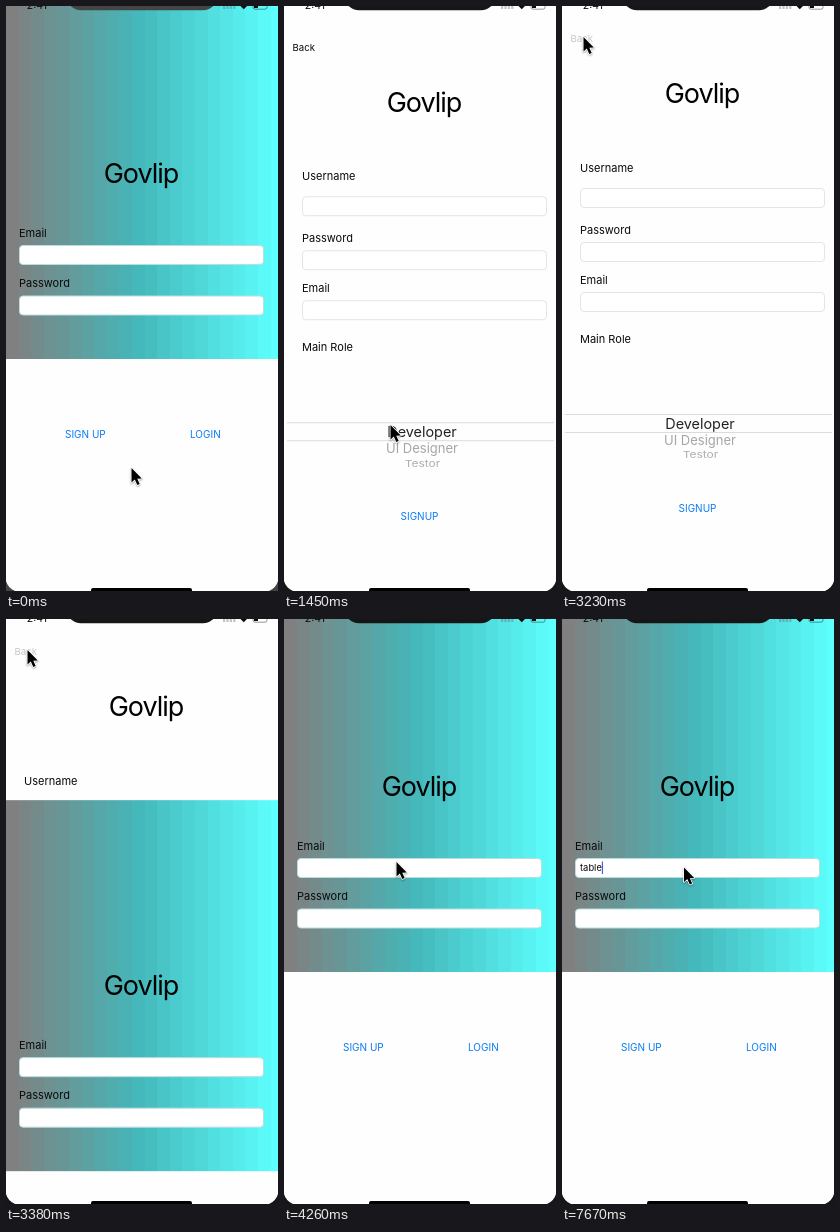
An HTML page with a canvas that plays this animation: 272 by 585 pixels, repeating every 8 s.

```html
<!DOCTYPE html>
<html lang="en">
<head>
<meta charset="utf-8">
<title>Sign-up flow</title>
<style>
  html, body { margin: 0; width: 100%; height: 100%; overflow: hidden; background: #fff; }
  canvas { display: block; width: 272px; height: 585px; }
</style>
</head>
<body>
<canvas id="stage"></canvas>
<script>
const W = 272, H = 585, LOOP = 8000, TICK = 148, LEAD = 32;
const SHEET_TOP = -18, TRAVEL = 605;
const BLUE = '#0a7cf5', INK = '#0a0a0a', APP = 'Govlip';

const canvas = document.getElementById('stage');
const ctx = canvas.getContext('2d');
const dpr = window.devicePixelRatio || 1;
canvas.width = W * dpr;
canvas.height = H * dpr;

// Pointer tip: time, x, y
const path = [
  [0, 125.5, 462], [120, 122, 459], [560, 87.5, 426], [1152, 87.5, 426],
  [1448, 106.5, 419], [1892, 165, 403], [2188, 194, 350], [2484, 130, 190],
  [2780, 44, 60], [2928, 21.5, 31], [3372, 21.5, 31], [3520, 25.5, 35.5],
  [3668, 44, 70], [3964, 96, 200], [4260, 112.5, 243], [6480, 112.5, 243],
  [6776, 122, 248.5], [LOOP, 122, 248.5]
];

function pointerAt(t) {
  let i = 1;
  while (i < path.length - 1 && t > path[i][0]) i++;
  const [t0, x0, y0] = path[i - 1], [t1, x1, y1] = path[i];
  const k = (t - t0) / (t1 - t0);
  return [x0 + (x1 - x0) * k, y0 + (y1 - y0) * k];
}

// Critically damped slide from the bottom edge
function slide(t, start, rate) {
  const u = Math.max(0, t - start) * rate;
  return TRAVEL * (1 + u) * Math.exp(-u);
}

function text(str, x, mid, size, { color = INK, align = 'left', spacing = 0, alpha = 1 } = {}) {
  ctx.font = `${size}px Inter, "Liberation Sans", sans-serif`;
  ctx.letterSpacing = spacing + 'px';
  ctx.textAlign = align;
  ctx.fillStyle = color;
  ctx.globalAlpha = alpha;
  ctx.fillText(str, x, mid + size * 0.364);
  ctx.globalAlpha = 1;
}

const title = (x, mid) => text(APP, x, mid, 27, { align: 'center', spacing: -1, color: '#000' });

function rounded(x, y, w, h, r) {
  ctx.beginPath();
  ctx.roundRect(x, y, w, h, r);
}

function field(x, y, w, edge) {
  rounded(x + 0.5, y + 0.5, w - 1, 19, 3.5);
  ctx.fillStyle = '#fff';
  ctx.fill();
  ctx.strokeStyle = edge;
  ctx.lineWidth = 1;
  ctx.stroke();
}

function mix(a, b, k) {
  return `rgb(${a.map((v, i) => Math.round(v + (b[i] - v) * k)).join()})`;
}

function bands(bottom) {
  const grey = [128, 128, 128], teal = [68, 184, 186], cyan = [94, 255, 255];
  const step = 12.6;
  for (let i = 0; i * step < W; i++) {
    ctx.fillStyle = i < 10 ? mix(grey, teal, i / 10) : mix(teal, cyan, (i - 10) / 11);
    const x = Math.round(i * step);
    ctx.fillRect(x, SHEET_TOP, Math.round((i + 1) * step) - x, bottom - SHEET_TOP);
  }
}

function page(offset, draw) {
  ctx.save();
  ctx.translate(0, offset);
  ctx.fillStyle = '#fefefe';
  ctx.fillRect(0, SHEET_TOP, W, TRAVEL);
  draw();
  ctx.restore();
}

function login(t, pressed) {
  bands(353);
  title(135, 167.5);
  text('Email', 13, 226.5, 11);
  field(13, 239, 245, '#b9dede');
  text('Password', 13, 277, 11);
  field(13, 289.5, 245, '#b9dede');
  text('SIGN UP', 59, 428, 10, { color: BLUE, alpha: pressed ? 0.3 : 1 });
  text('LOGIN', 184, 428, 10, { color: BLUE });
  if (t >= 6900) typing(t);
}

function typing(t) {
  const count = Math.max(0, Math.min(5, Math.floor((t - 7072) / TICK) + 1));
  const word = 'table'.slice(0, count);
  text(word, 18, 249, 9.4);
  ctx.fillStyle = '#4a5fe0';
  ctx.fillRect(18 + ctx.measureText(word).width, 242.5, 1.2, 12.5);
}

function signup(pressed) {
  text('Back', 8.5, 33, 9.6, { alpha: pressed ? 0.22 : 1 });
  title(140, 87.5);
  text('Username', 18, 162, 11);
  field(18, 182, 245, '#e4e4e4');
  text('Password', 18, 224, 11);
  field(18, 236, 245, '#e4e4e4');
  text('Email', 18, 274, 11);
  field(18, 286, 245, '#e4e4e4');
  text('Main Role', 18, 333, 11);
  picker();
  text('SIGNUP', 135.5, 502, 10, { color: BLUE, align: 'center' });
}

function picker() {
  ctx.fillStyle = '#dcdcdc';
  ctx.fillRect(3, 408, 267, 1);
  ctx.fillRect(3, 426, 267, 1);
  text('Developer', 138, 418, 14.4, { align: 'center', color: '#222' });
  text('UI Designer', 138, 434.5, 13, { align: 'center', color: '#a6a6a6' });
  ctx.save();
  ctx.beginPath();
  ctx.rect(100, 442, 80, 11);
  ctx.clip();
  ctx.translate(0, 449);
  ctx.scale(1, 0.8);
  text('Testor', 138.5, 0, 12, { align: 'center', color: '#adadad' });
  ctx.restore();
}

function phone(shell) {
  text('2:41', 31, -0.5, 10.5, { align: 'center' });
  ctx.fillStyle = 'rgba(90,110,110,.4)';
  for (let i = 0; i < 4; i++) ctx.fillRect(217 + i * 3.4, 0, 2.2, 3);
  ctx.fillStyle = INK;
  ctx.beginPath();
  ctx.moveTo(234.5, 0);
  ctx.lineTo(241, 0);
  ctx.lineTo(237.8, 3.2);
  ctx.fill();
  ctx.fillRect(248, 0, 4, 2);
  rounded(247, -5, 14, 8.2, 2);
  ctx.strokeStyle = 'rgba(20,40,40,.6)';
  ctx.lineWidth = 0.8;
  ctx.stroke();

  ctx.fillStyle = shell;
  rounded(61, -26, 150, 30.3, 14);
  ctx.fill();
  // Screen corners
  for (const side of [0, W]) {
    const dir = side ? -1 : 1;
    ctx.beginPath();
    ctx.moveTo(side, 575);
    ctx.quadraticCurveTo(side + dir * 2, 582, side + dir * 9, H);
    ctx.lineTo(side, H);
    ctx.fill();
  }
  ctx.fillStyle = '#000';
  rounded(85, 582, 101, 5, 2);
  ctx.fill();
}

function pointer(x, y) {
  const shape = [0, 0, 0, 14.5, 3.3, 11.5, 5.8, 17, 8.2, 16, 5.8, 10.7, 10.3, 10.4];
  ctx.save();
  ctx.translate(x, y);
  ctx.beginPath();
  for (let i = 0; i < shape.length; i += 2) ctx.lineTo(shape[i], shape[i + 1]);
  ctx.closePath();
  ctx.lineJoin = 'round';
  ctx.shadowColor = 'rgba(0,0,0,.35)';
  ctx.shadowBlur = 2 * dpr;
  ctx.shadowOffsetY = dpr;
  ctx.strokeStyle = '#fff';
  ctx.lineWidth = 1.6;
  ctx.stroke();
  ctx.shadowColor = 'transparent';
  ctx.fillStyle = '#000';
  ctx.fill();
  ctx.restore();
}

function render(now) {
  // The screen refreshes in coarse ticks
  const t = Math.max(0, Math.floor((now % LOOP + LEAD) / TICK) * TICK - LEAD);
  ctx.setTransform(dpr, 0, 0, dpr, 0, 0);
  page(0, () => login(t, t >= 856 && t < 1152));
  if (t >= 1093 && t < 4260) {
    page(slide(t, 1093, 0.0177), () => signup(t >= 3220));
  }
  if (t >= 3260 && t < 4260) page(slide(t, 3260, 0.0206), () => login(t, false));
  phone(t < 856 ? '#444' : '#161616');
  pointer(...pointerAt(t));
}

const begin = performance.now();
function loop() {
  render(performance.now() - begin);
  requestAnimationFrame(loop);
}
loop();
</script>
</body>
</html>
```
